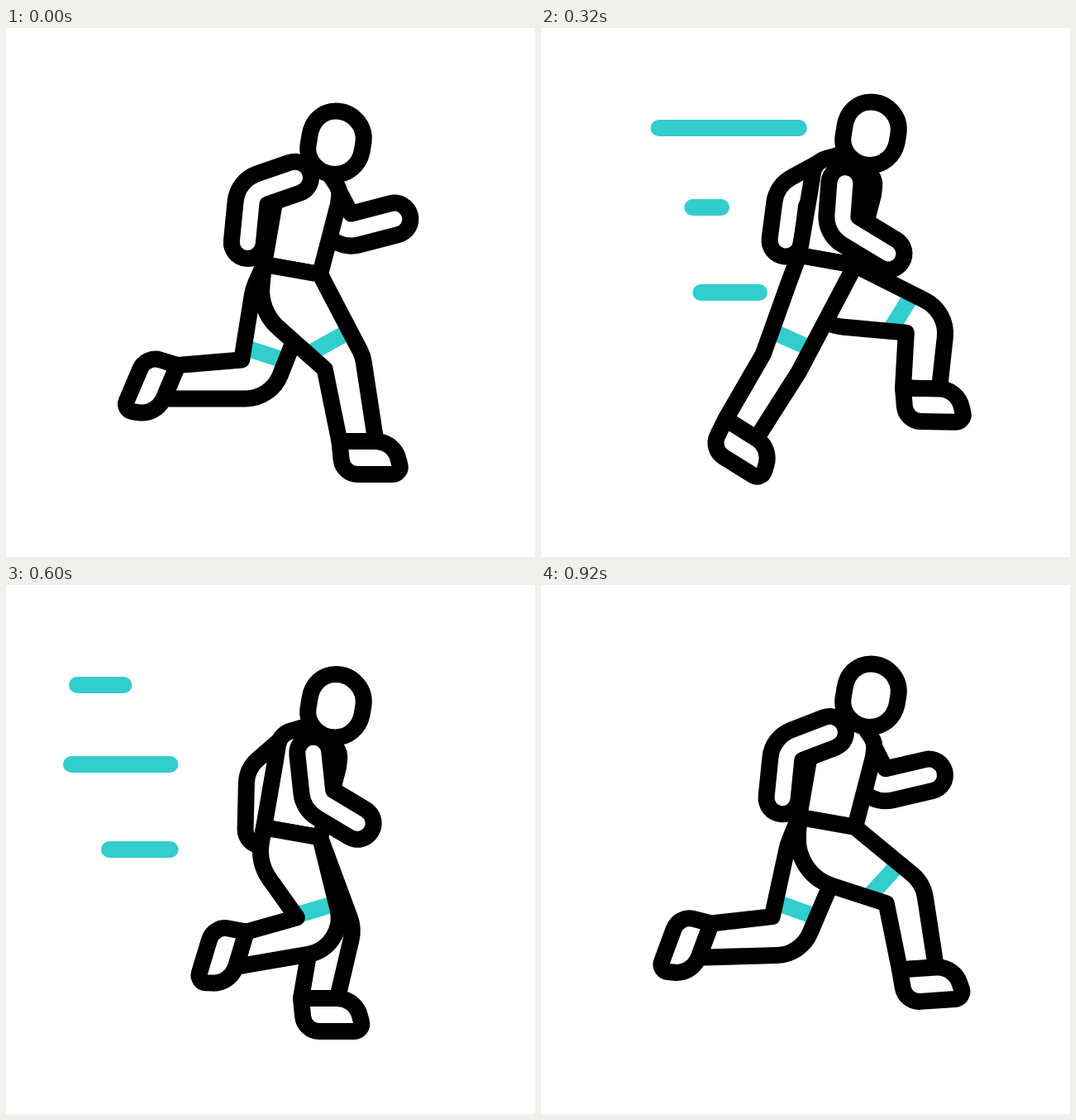
These frames come from a looping animation (640 px wide and 640 px high, 0.96 s). An HTML page with a canvas:

```html
<!DOCTYPE html>
<html lang="en">
<head>
<meta charset="utf-8">
<title>Runner</title>
<style>
  html, body { margin: 0; width: 100%; height: 100%; overflow: hidden; background: #fff; }
  canvas { display: block; width: 100%; height: 100%; }
</style>
</head>
<body>
<canvas id="stage" width="640" height="640"></canvas>
<script>
const ctx = document.getElementById('stage').getContext('2d');
const TEAL = '#32cdcd', STROKE = 20;
const CYCLE = 1000, LOOP = 960, STEP = 40;

// One stride, shared by both sides half a cycle apart
// phase, knee, ankle, foot angle
const legPose = track([
  [150, 394, 418, 374, 500, 0],
  [260, 310, 412, 267, 490, 14],
  [320, 290, 406, 242, 485, 32],
  [480, 299, 425, 197, 428, 113],
  [650, 388, 420, 292, 442, 106],
  [760, 447, 387, 421, 471, 31],
  [820, 467, 356, 460, 436, 1],
  [960, 440, 373, 456, 464, -4],
  [980, 412, 401, 435, 500, 0]
]);
// phase, elbow, hand
const armPose = track([
  [150, 312, 234, 311, 297],
  [260, 372, 266, 403, 303],
  [320, 364, 239, 420, 273],
  [480, 408, 246, 471, 229],
  [650, 375, 260, 421, 290],
  [760, 322, 242, 345, 298],
  [820, 303, 203, 296, 257],
  [980, 298, 198, 292, 258]
]);

// Each line grows leftwards, then its tail follows
const speedLines = [
  { y: 121, from: 312, to: 86, grow: 80, shrink: 400, span: 320 },
  { y: 217, from: 218, to: 79, grow: 240, shrink: 595, span: 320 },
  { y: 320, from: 264, to: 125, grow: 132, shrink: 466, span: 370 }
];

// Corners are [x, y, radius]
const torso = [[312, 286], [326, 205], [331, 173, 22], [362, 164], [388, 172],
  [404, 196, 20], [402, 213], [380, 298]];
const shoeTail = [[66, 2, 28], [76, 40, 9], [4, 40, 20]];
const head = new Path2D('M367.5 130C370 112 383 100.5 399 100.5C419 100.5 435 118 432.5 138' +
  'L430.5 150C427 166 414 177 398 177C378 177 363 160 365.5 142Z');

// Smooth periodic interpolation without overshoot
function track(keys) {
  const n = keys.length;
  const key = i => keys[(i + n) % n];
  const time = i => key(i)[0] + CYCLE * Math.floor(i / n);
  const slope = (i, c) => (key(i + 1)[c] - key(i)[c]) / (time(i + 1) - time(i));
  const tangent = (i, c) => {
    const a = slope(i - 1, c), b = slope(i, c);
    return a * b > 0 ? 2 * a * b / (a + b) : 0;
  };
  return phase => {
    const t = phase % CYCLE;
    let i = n - 1;
    while (i >= 0 && keys[i][0] > t) i--;
    const span = time(i + 1) - time(i), u = (t - time(i)) / span, v = 1 - u;
    return keys[0].slice(1).map((_, j) => {
      const c = j + 1;
      return v * v * (1 + 2 * u) * key(i)[c] + u * u * (3 - 2 * u) * key(i + 1)[c] +
        span * u * v * (v * tangent(i, c) - u * tangent(i + 1, c));
    });
  };
}

// The body rises and falls twice per stride
function bob(t) {
  const a = 4 * Math.PI * t / CYCLE;
  return 10 * Math.sin(a) + 2 * Math.cos(a) - 2;
}

const mix = (a, b, k) => [a[0] + (b[0] - a[0]) * k, a[1] + (b[1] - a[1]) * k];
const along = (p, d, k) => [p[0] + d[0] * k, p[1] + d[1] * k];
const dot = (a, b) => a[0] * b[0] + a[1] * b[1];
const side = d => [d[1], -d[0]];
function unit(x, y) {
  const l = Math.hypot(x, y);
  return [x / l, y / l];
}
const toward = (a, b) => unit(b[0] - a[0], b[1] - a[1]);

// Closed polygon with rounded corners
function outline(pts) {
  const path = new Path2D(), n = pts.length;
  path.moveTo(pts[0][0], pts[0][1]);
  for (let i = 1; i < n; i++) {
    const p = pts[i - 1], q = pts[i], s = pts[(i + 1) % n];
    if (!q[2]) { path.lineTo(q[0], q[1]); continue; }
    const ax = q[0] - p[0], ay = q[1] - p[1], bx = s[0] - q[0], by = s[1] - q[1];
    const turn = Math.abs(Math.atan2(ax * by - ay * bx, ax * bx + ay * by));
    const room = .9 * Math.min(Math.hypot(ax, ay), Math.hypot(bx, by));
    path.arcTo(q[0], q[1], s[0], s[1], Math.min(q[2], room / Math.tan(turn / 2 + 1e-4)));
  }
  path.closePath();
  return path;
}

function stroke(path, width = STROKE, color = '#000', cap = 'round') {
  ctx.lineCap = cap;
  ctx.lineWidth = width;
  ctx.strokeStyle = color;
  ctx.stroke(path);
}

function fill(path) {
  ctx.fillStyle = '#fff';
  ctx.fill(path);
}

function segment(a, b) {
  const path = new Path2D();
  path.moveTo(a[0], a[1]);
  path.lineTo(b[0], b[1]);
  return path;
}

function drawLeg([kx, ky, ax, ay, angle], dy) {
  const back = [312, 286 + dy], front = [380, 298 + dy];
  const hip = mix(back, front, .5), knee = [kx, ky], ankle = [ax, ay];

  // Mitre the knee between thigh and shin
  const thigh = toward(hip, knee), shin = toward(knee, ankle);
  const bend = unit(thigh[0] + shin[0], thigh[1] + shin[1]);
  const half = 24 / dot(bend, thigh);
  const kneeBack = along(knee, side(bend), -half);
  const kneeFront = [...along(knee, side(bend), half), 45];
  const seat = [302 + (kx - 345) * .07, 340 + (kx - 400) * .25, 60];

  const a = angle * Math.PI / 180, c = Math.cos(a), s = Math.sin(a);
  const heel = along(ankle, [c, s], -22), instep = along(ankle, [c, s], 22);

  const leg = outline([back, seat, kneeBack, heel, instep, kneeFront, front]);
  fill(leg);
  const mid = mix(hip, knee, .77);
  ctx.save();
  ctx.clip(leg);
  stroke(segment(along(mid, side(thigh), -45), along(mid, side(thigh), 45)), STROKE, TEAL, 'butt');
  ctx.restore();
  stroke(leg);

  const tail = shoeTail.map(([x, y, r]) => [heel[0] + x * c - y * s, heel[1] + x * s + y * c, r]);
  const shoe = outline([heel, instep, ...tail]);
  fill(shoe);
  stroke(shoe);
}

function drawArm([ex, ey, hx, hy], dy) {
  const arm = new Path2D();
  arm.moveTo(350 + (ex - 300) * .28, 183 + (ey - 205) * .3 + dy / 2);
  arm.arcTo(ex, ey, hx, hy, 20);
  arm.lineTo(hx, hy);
  stroke(arm, 59);
  stroke(arm, 19, '#fff');
}

function drawSpeedLine({ y, from, to, grow, shrink, span }, t) {
  const reach = start => from + (to - from) * Math.min(1, Math.max(0, (t - start) / span));
  const x0 = reach(grow), x1 = reach(shrink);
  if (x1 - x0 > .5) stroke(segment([x0, y], [x1, y]), STROKE, TEAL);
}

function draw(t) {
  const dy = bob(t), opposite = t + CYCLE / 2;
  ctx.fillStyle = '#fff';
  ctx.fillRect(0, 0, 640, 640);
  ctx.lineJoin = 'round';

  speedLines.forEach(l => drawSpeedLine(l, t));
  drawArm(armPose(opposite), dy);
  drawLeg(legPose(opposite), dy);

  const body = outline(torso.map(([x, y, r]) => [x, y + dy, r]));
  fill(body);
  stroke(body);

  drawLeg(legPose(t), dy);
  drawArm(armPose(t), dy);

  ctx.save();
  ctx.translate(0, dy);
  fill(head);
  stroke(head);
  ctx.restore();
}

const start = performance.now();
function tick() {
  const t = Math.floor((performance.now() - start) % LOOP / STEP) * STEP;
  draw(t < 600 ? t : t + STEP); // the cycle skips one step here
  requestAnimationFrame(tick);
}
tick();
</script>
</body>
</html>
```
